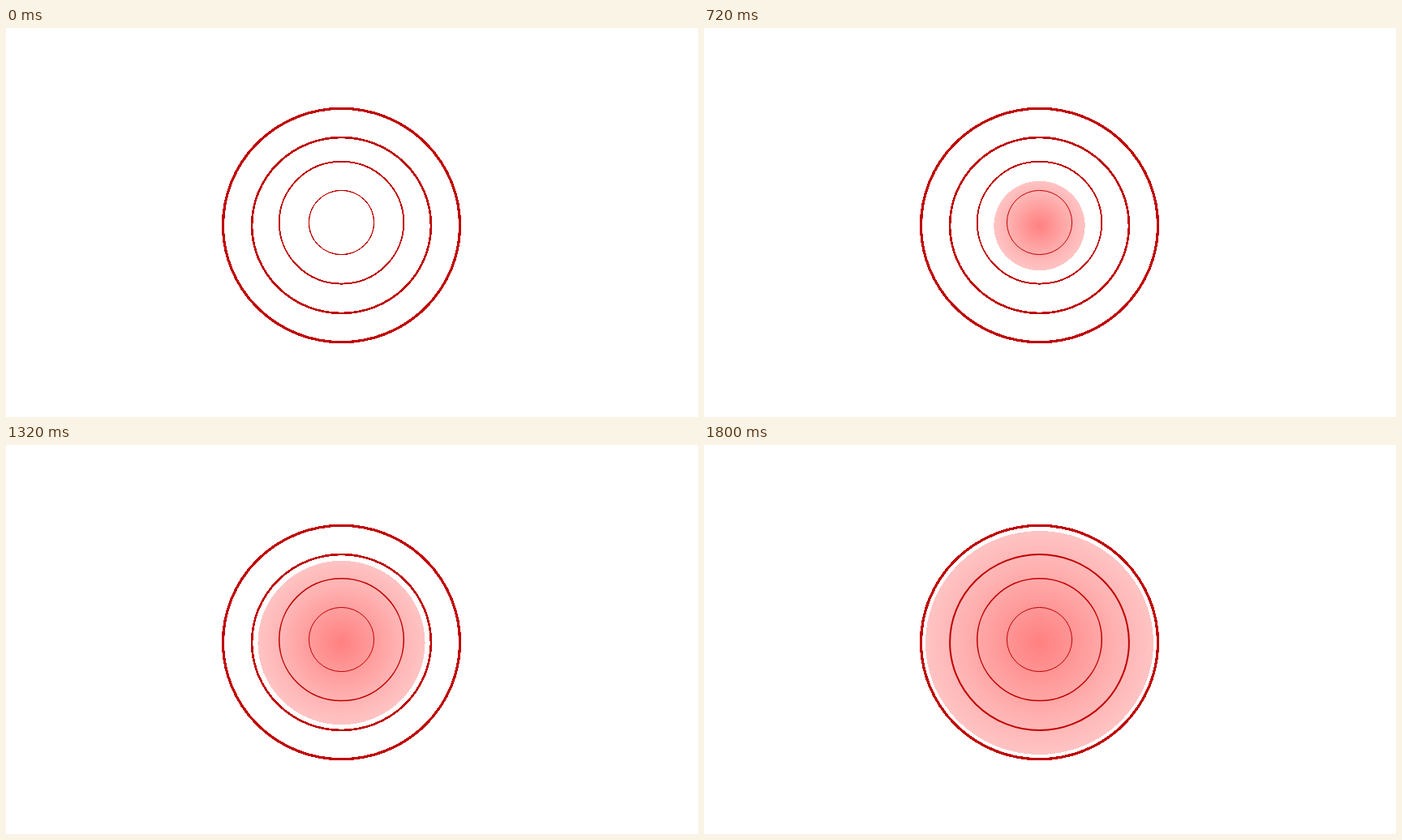
Recreate the animation shown at these times as an HTML page. Size 853 by 480 pixels, loop 1860 ms.

```html
<!DOCTYPE html>
<html lang="en">
<head>
<meta charset="utf-8">
<title>Pulse</title>
<style>
  html, body { margin: 0; height: 100%; overflow: hidden; background: #fff; }
  svg { display: block; width: 100%; height: 100%; }
  ellipse { stroke: #c00000; fill: none; }
  #disc { stroke: none; fill: url(#glow); }
  .crisp { shape-rendering: crispEdges; }
</style>
</head>
<body>
<svg viewBox="0 0 853 480">
  <defs>
    <radialGradient id="glow" r="0.7071">
      <stop offset="0" stop-color="#ff8080"/>
      <stop offset="0.5" stop-color="#ffb3b3"/>
      <stop offset="1" stop-color="#ffdada"/>
    </radialGradient>
    <g id="rings">
      <ellipse cx="413.5" cy="243.5" rx="146" ry="144.2"/>
      <ellipse cx="413.5" cy="243.5" rx="110.4" ry="108.5"/>
      <ellipse cx="413.5" cy="240.2" rx="76.8" ry="75.4"/>
      <ellipse cx="413.5" cy="240" rx="40.1" ry="39.6"/>
    </g>
  </defs>
  <g id="under" class="crisp"></g>
  <ellipse id="disc" class="crisp" cx="413.5" cy="244"/>
  <g id="over"></g>
</svg>
<script>
const LOOP = 1860, STEP = 60, START = 240, END = 1800;
const disc = document.getElementById('disc');
const rings = [...document.getElementById('rings').children];

// Hard-edged rings lie under the disc, finer smooth ones over it.
function addRings(id, widths) {
  rings.forEach((ring, i) => {
    const copy = ring.cloneNode();
    copy.setAttribute('stroke-width', widths[i]);
    document.getElementById(id).append(copy);
  });
}
addRings('under', [3.2, 2.6, 1.9, 1.1]);
addRings('over', [2.6, 2, 1.5, 1]);

function draw(now) {
  const t = Math.floor(now % LOOP / STEP) * STEP;
  const grow = t < START ? 0 : t / END;
  disc.setAttribute('rx', 140.5 * grow);
  disc.setAttribute('ry', 138 * grow);
  requestAnimationFrame(time => draw(Math.max(0, time - origin)));
}
const origin = performance.now();
draw(0);
</script>
</body>
</html>
```
